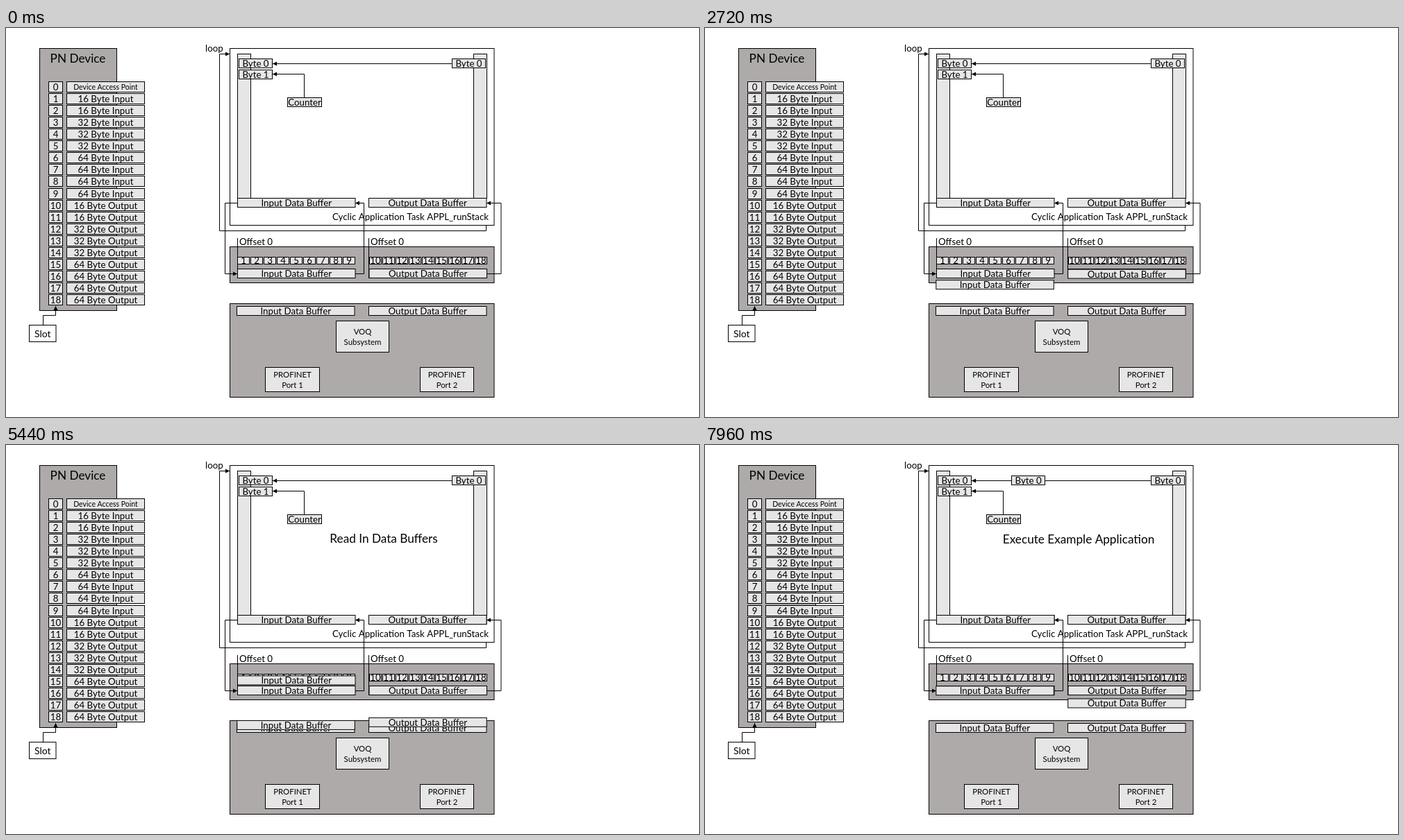
Animation of 998x561 px, one loop 8000 ms. Source, as an HTML page with a canvas:

```html
<!DOCTYPE html>
<html lang="en">
<head>
<meta charset="utf-8">
<title>Device data flow</title>
<style>
html, body { margin: 0; width: 100%; height: 100%; overflow: hidden; background: #fff; }
canvas { display: block; width: 998px; height: 561px; }
</style>
</head>
<body>
<canvas id="stage" width="998" height="561"></canvas>
<script>
const ctx = document.getElementById('stage').getContext('2d');
const GREY = '#aeaaaa', LIGHT = '#e7e6e6', WHITE = '#fff', INK = '#000';
const SMALL = 11.4, BODY = 13.3, TITLE = 17.2;
const IN = 'Input Data Buffer', OUT = 'Output Data Buffer';

const LOOP = 8000, STEP = 40;
const MOVE = 1800, CYCLE = 1950;
const IN_START = 70, OUT_START = 1058;
const READ_START = OUT_START + CYCLE;
const READ_IN_START = READ_START + CYCLE;
const EXEC_START = READ_IN_START + CYCLE;

function text(str, x, y, size = BODY, align = 'center') {
  ctx.font = `${size}px Lato, Carlito, sans-serif`;
  ctx.textAlign = align;
  ctx.fillStyle = INK;
  ctx.fillText(str, x, y + size * 0.37);
}

function box(x, y, w, h, fill, label, size) {
  ctx.fillStyle = fill;
  ctx.fillRect(x, y, w, h);
  ctx.strokeRect(x, y, w, h);
  if (!label) return;
  const lines = label.split('\n');
  lines.forEach((line, i) =>
    text(line, x + w / 2, y + h / 2 + (i - (lines.length - 1) / 2) * 15, size));
}

function line(...pts) {
  ctx.beginPath();
  for (let i = 0; i < pts.length; i += 2) ctx.lineTo(pts[i], pts[i + 1]);
  ctx.stroke();
}

// Polyline ending in a filled arrowhead
function arrow(...pts) {
  line(...pts);
  const [px, py, x, y] = pts.slice(-4);
  const dx = Math.sign(x - px), dy = Math.sign(y - py);
  ctx.fillStyle = INK;
  ctx.beginPath();
  ctx.moveTo(x, y);
  ctx.lineTo(x - 6 * dx - 3 * dy, y - 6 * dy - 3 * dx);
  ctx.lineTo(x - 6 * dx + 3 * dy, y - 6 * dy + 3 * dx);
  ctx.fill();
}

const buffer = (label, x, y) => box(x, y - 6.5, 169.5, 13, LIGHT, label);
const byteBox = (label, x, y) => box(x, y, 48, 13, LIGHT, label);

function drawDevice() {
  box(48.5, 29.5, 111, 378, GREY);
  text('PN Device', 103.5, 44, TITLE);
  const kinds = [[0, ''], [16, 'Input'], [32, 'Input'], [64, 'Input'],
                 [16, 'Output'], [32, 'Output'], [64, 'Output']];
  const counts = [1, 2, 3, 4, 2, 3, 4];
  let slot = 0;
  kinds.forEach(([bytes, dir], k) => {
    for (let n = 0; n < counts[k]; n++, slot++) {
      const y = Math.round(77 + slot * 17.06) + 0.5;
      box(61.5, y, 20, 15, LIGHT, String(slot));
      if (bytes) box(87.5, y, 112, 15, LIGHT, `${bytes} Byte ${dir}`);
      else box(87.5, y, 112, 15, LIGHT, 'Device Access Point', 10.5);
    }
  });
  box(33.5, 428.5, 38.5, 24, WHITE, 'Slot', 14);
  arrow(53.5, 428, 53.5, 414.5, 71.5, 414.5, 71.5, 401);
}

function drawApplication() {
  box(322.5, 29.5, 380.5, 255, WHITE);
  box(333.5, 37.5, 19, 208, LIGHT);
  box(673.5, 37.5, 19, 208, LIGHT);
  text('Cyclic Application Task APPL_runStack', 695, 272, BODY, 'right');
  text('loop', 287, 29, BODY, 'left');
  arrow(691.5, 285, 691.5, 292.5, 307.5, 292.5, 307.5, 37.5, 322, 37.5);
  byteBox('Byte 0', 335.5, 44.5);
  byteBox('Byte 1', 335.5, 60.5);
  byteBox('Byte 0', 642.5, 44.5);
  box(405.5, 100.5, 49, 13, LIGHT, 'Counter');
  arrow(642, 51.5, 384, 51.5);
  arrow(429.5, 100, 429.5, 66.5, 384, 66.5);
  buffer(IN, 333.5, 252);
  buffer(OUT, 522.5, 252);
}

function drawStack() {
  box(322.5, 315.5, 380.5, 52, GREY);
  for (let i = 0; i < 18; i++) {
    const x = (i < 9 ? 333.5 : 523.5) + (i % 9) * 19;
    box(x, 330.5, 17, 10, LIGHT, String(i + 1));
  }
  buffer(IN, 333.5, 354);
  buffer(OUT, 523, 354);
  for (const x of [333.5, 522.5]) {
    line(x, 303, x, 361);
    text('Offset 0', x + 2.5, 308, BODY, 'left');
  }
  arrow(333, 252.5, 315.5, 252.5, 315.5, 354.5, 333, 354.5);
  arrow(503, 354.5, 515.5, 354.5, 515.5, 252.5, 503, 252.5);
  arrow(692, 354.5, 713, 354.5, 713, 252.5, 692, 252.5);
}

function drawNetwork() {
  box(322.5, 397.5, 380.5, 135, GREY);
  buffer(IN, 332.5, 408);
  buffer(OUT, 522.5, 408);
  box(475.5, 422.5, 76, 45, LIGHT, 'VOQ\nSubsystem', SMALL);
  box(373.5, 489.5, 78, 35, LIGHT, 'PROFINET\nPort 1', SMALL);
  box(596.5, 489.5, 77, 35, LIGHT, 'PROFINET\nPort 2', SMALL);
}

// Constant acceleration to the midpoint, then constant braking
function ease(p) {
  p = Math.min(1, Math.max(0, p));
  return p < 0.5 ? 2 * p * p : 1 - 2 * (1 - p) ** 2;
}

// Position between a and b; repeats every `cycle` ms
function travel(t, start, a, b, cycle = Infinity) {
  const local = cycle === Infinity ? t - start : (t - start) % cycle;
  return a + (b - a) * ease(local / MOVE);
}

function drawMoving(t) {
  if (t >= EXEC_START) text('Execute Example Application', 538, 136, TITLE);
  else if (t >= READ_START) text('Read In Data Buffers', 544, 134.5, TITLE);

  if (t >= IN_START) buffer(IN, 332.8, travel(t, IN_START, 354, 407.5, CYCLE));
  if (t >= OUT_START) buffer(OUT, 522.7, travel(t, OUT_START, 407.5, 354, CYCLE));
  if (t >= READ_START) buffer(OUT, 522.5, travel(t, READ_START, 354, 252));
  if (t >= READ_IN_START) buffer(IN, 333.5, travel(t, READ_IN_START, 354, 252));
  if (t >= EXEC_START) byteBox('Byte 0', travel(t, EXEC_START, 642.5, 335.5), 44.5);
}

function draw(now) {
  const t = Math.floor((now % LOOP) / STEP) * STEP;
  ctx.fillStyle = WHITE;
  ctx.fillRect(0, 0, 998, 561);
  ctx.strokeStyle = INK;
  ctx.lineWidth = 1;
  drawDevice();
  drawApplication();
  drawStack();
  drawNetwork();
  drawMoving(t);
}

let origin;
function tick(now) {
  origin ??= now;
  draw(now - origin);
  requestAnimationFrame(tick);
}
requestAnimationFrame(tick);
</script>
</body>
</html>
```
